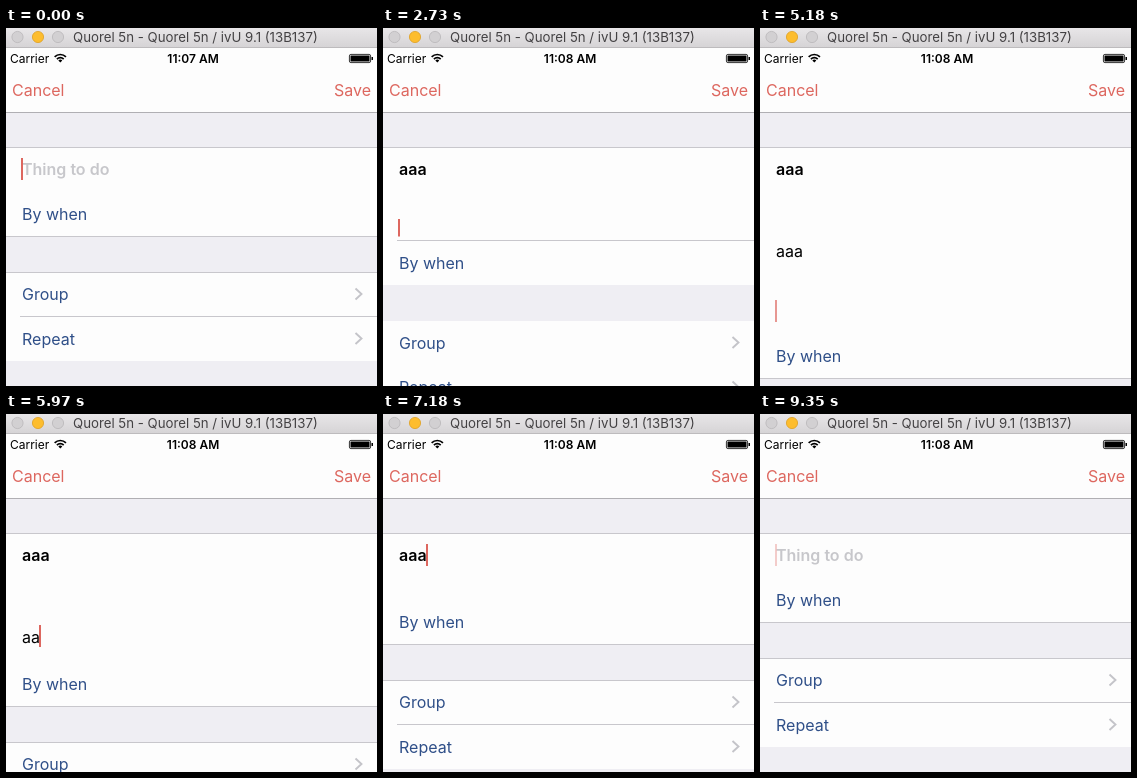
An HTML page with a canvas that plays this animation: 371x358 px, repeating every 9450 ms.

```html
<!DOCTYPE html>
<html lang="en">
<head>
<meta charset="utf-8">
<title>Growing text field</title>
<style>
html, body { margin: 0; width: 100%; height: 100%; overflow: hidden; background: #efeff4; }
canvas { display: block; }
</style>
</head>
<body>
<canvas id="stage" width="371" height="358"></canvas>
<script>
const W = 371, H = 358, LOOP = 9450, LINE = 20.29, GROW = 300, FADE = 120;
const ctx = document.getElementById('stage').getContext('2d');

const CORAL = '#dd675f', BLUE = '#2f4f88', HAIR = '#c8c7cc';
const CELL = '#fdfdfd', BACK = '#efeef3';
const REGULAR = '400 16px Inter, sans-serif', BOLD = '600 16px Inter, sans-serif';

// Keystrokes: '<' is backspace.
const keys = [];
const press = (key, ...times) => times.forEach(at => keys.push({ at, key }));
press('a', 1450, 1620, 1855);
press('\n', 2180, 2390, 2600, 2810);
press('a', 3250, 3370, 3600);
press('\n', 3780, 4070, 4520);
press('<', 5240, 5490, 5743, 5930, 6130, 6370, 6560, 6760, 6950, 7145, 7335, 7460, 7750);

// Caret fades: [time, target opacity]
const blinks = [[290, 0], [640, 1], [1220, 0], [4870, 0], [5100, 1], [8290, 0], [8750, 1], [9270, 0]];

const clamp = v => Math.max(0, Math.min(1, v));
const ease = p => (1 - Math.cos(Math.PI * clamp(p))) / 2;

function stateAt(t) {
  let text = '', offset = 0, lastKey = -1;
  for (const { at, key } of keys) {
    if (at > t) break;
    lastKey = at;
    const move = LINE * ease((t - at) / GROW);
    if (key === '<') {
      if (text.endsWith('\n')) offset -= move;
      text = text.slice(0, -1);
    } else {
      if (key === '\n') offset += move;
      text += key;
    }
  }
  let caret = 1;
  for (const [at, to] of blinks) {
    if (at <= t && at > lastKey) {
      const p = clamp((t - at) / FADE);
      caret = to ? p : 1 - p;
    }
  }
  return { text, caret, offset: Math.round(offset * 2) / 2 };
}

function rect(x, y, w, h, color) {
  ctx.fillStyle = color;
  ctx.fillRect(x, y, w, h);
}

function label(str, x, y, color, font = REGULAR, align = 'left') {
  ctx.font = font;
  ctx.textAlign = align;
  ctx.fillStyle = color;
  ctx.fillText(str, x, y);
}

function band(top, bottom, color) {
  const y = Math.round(top);
  rect(0, y, W, Math.round(bottom) - y, color);
}

function hairline(y, x = 0) {
  rect(x, Math.round(y), W - x, 1, HAIR);
}

function chevron(y) {
  ctx.strokeStyle = '#c4c4c9';
  ctx.lineWidth = 1.9;
  ctx.beginPath();
  ctx.moveTo(349.5, y - 5.5);
  ctx.lineTo(355.5, y);
  ctx.lineTo(349.5, y + 5.5);
  ctx.stroke();
}

function windowBar() {
  const shade = ctx.createLinearGradient(0, 0, 0, 20);
  shade.addColorStop(0, '#e8e6e8');
  shade.addColorStop(1, '#d5d3d5');
  rect(0, 0, W, 20, shade);
  rect(0, 19, W, 1, '#bdbbbd');
  [[11.5, '#d2d0d2', '#b9b7b9'], [32, '#fdbd2e', '#dfa023'], [52, '#d2d0d2', '#b9b7b9']].forEach(([x, fill, edge]) => {
    ctx.beginPath();
    ctx.arc(x, 9, 5.6, 0, 7);
    ctx.fillStyle = fill;
    ctx.fill();
    ctx.strokeStyle = edge;
    ctx.lineWidth = 0.8;
    ctx.stroke();
  });
  label('Quorel 5n - Quorel 5n / ivU 9.1 (13B137)', 67, 14, '#434143', '400 13.25px Inter, sans-serif');
}

function wifi(x, y) {
  ctx.strokeStyle = ctx.fillStyle = '#000';
  ctx.lineWidth = 1.7;
  [4.8, 8].forEach(r => {
    ctx.beginPath();
    ctx.arc(x, y, r, -Math.PI * 0.75, -Math.PI * 0.25);
    ctx.stroke();
  });
  ctx.beginPath();
  ctx.moveTo(x, y);
  ctx.arc(x, y, 2.8, -Math.PI * 0.75, -Math.PI * 0.25);
  ctx.fill();
}

function battery() {
  ctx.strokeStyle = '#000';
  ctx.lineWidth = 0.8;
  ctx.beginPath();
  ctx.roundRect(343.4, 26.4, 21.2, 8.2, 1.5);
  ctx.stroke();
  rect(344.5, 27.5, 19, 6, '#000');
  rect(365.5, 29, 1.5, 3, '#000');
}

function header(t) {
  rect(0, 20, W, 64, CELL);
  rect(0, 84, W, 1, '#b0afb3');
  label('Carrier', 4, 34.5, '#000', '400 12px Inter, sans-serif');
  wifi(54.3, 34.5);
  label(t < 700 ? '11:07 AM' : '11:08 AM', 187, 34.5, '#000', '600 12px Inter, sans-serif', 'center');
  battery();
  label('Cancel', 6, 68, CORAL);
  label('Save', 365, 68, CORAL, REGULAR, 'right');
}

function field({ text, caret, offset }) {
  const lines = text.split('\n');
  ctx.save();
  ctx.beginPath();
  ctx.rect(0, 121, W, 39 + offset);
  ctx.clip();
  if (!text) label('Thing to do', 16, 147, '#c7c7cb', BOLD);
  lines.forEach((line, i) => {
    label(line, 16, Math.round(147.4 + LINE * i), '#000', i ? REGULAR : BOLD);
  });
  const last = lines.length - 1;
  ctx.font = last ? REGULAR : BOLD;
  const x = 15 + Math.round(ctx.measureText(lines[last]).width);
  ctx.globalAlpha = caret;
  rect(x, Math.round(130 + LINE * last), 2, 22, CORAL);
  ctx.restore();
}

function table(state) {
  const d = state.offset;
  band(85, H, BACK);
  band(120, 208.5 + d, CELL);
  band(244.5 + d, 332.5 + d, CELL);
  hairline(119);
  // Half-pixel hairlines vanish when the view is shown at half scale.
  if (Number.isInteger(d)) {
    hairline(208 + d);
    hairline(244 + d);
    hairline(288 + d, 14);
  } else {
    hairline(163.5 + d, 14);
    hairline(332.5 + d);
  }
  field(state);
  label('By when', 16, 192 + d, BLUE);
  label('Group', 16, 272 + d, BLUE);
  label('Repeat', 16, 316.5 + d, BLUE);
  chevron(266 + d);
  chevron(310.5 + d);
}

function draw(t) {
  table(stateAt(t));
  header(t);
  windowBar();
}

const start = performance.now();
function tick() {
  draw((performance.now() - start) % LOOP);
  requestAnimationFrame(tick);
}
tick();
</script>
</body>
</html>
```
